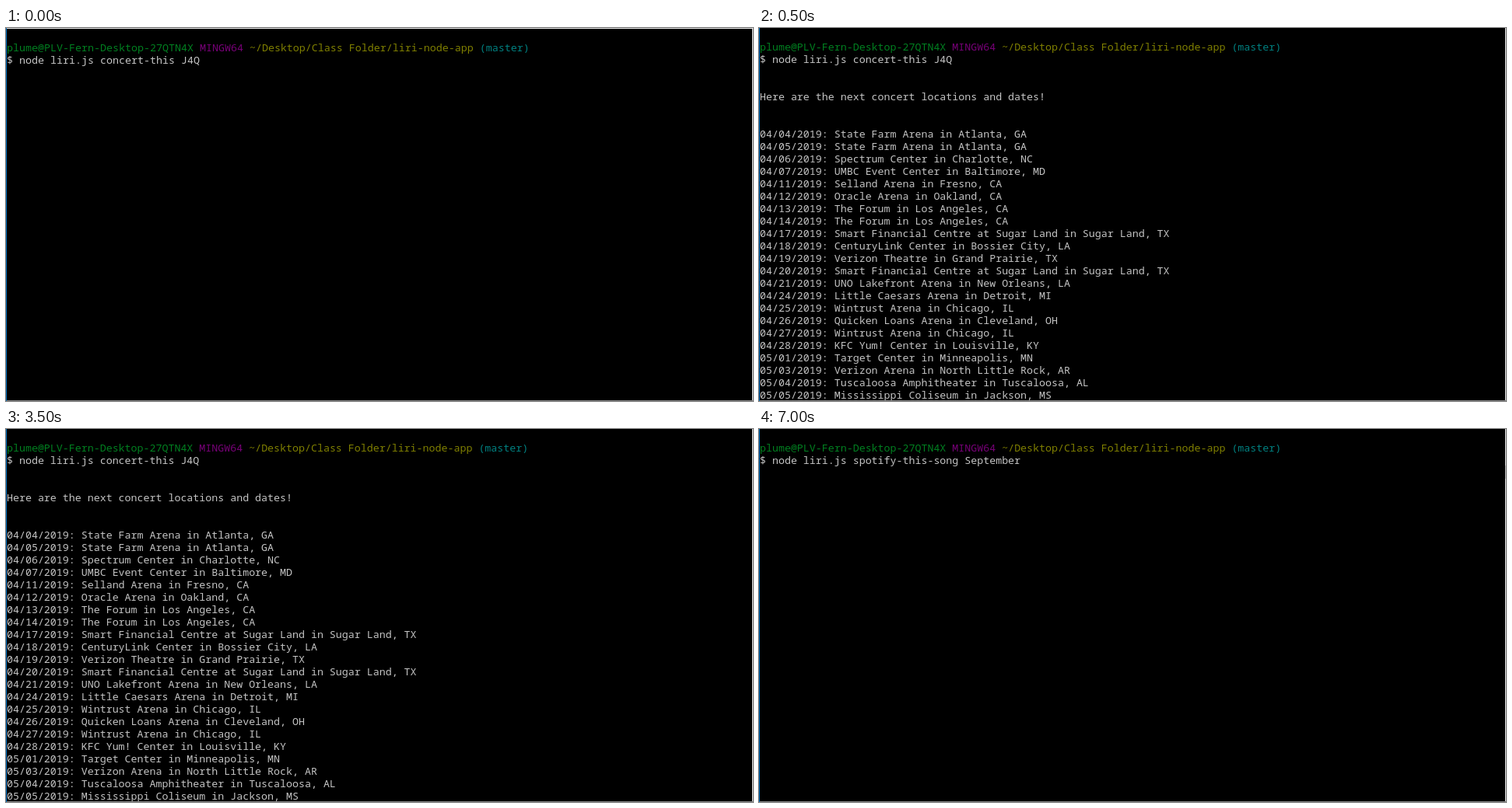
Animation of 960x480 px, one loop 8000 ms. Source, as an HTML page:

```html
<!DOCTYPE html>
<html lang="en">
<head>
<meta charset="utf-8">
<title>Terminal session</title>
<style>
  html, body { margin: 0; width: 100%; height: 100%; overflow: hidden; background: #000; }
  #stage { position: relative; width: 960px; height: 480px; overflow: hidden; background: #000; }
  .screen { position: absolute; inset: 0; opacity: 0; }
  pre {
    position: absolute; left: 1px; top: 16px; margin: 0;
    font: 13.31px/15.98px "Noto Sans Mono", monospace;
    color: #c4c4c4; white-space: pre;
  }
  .user { color: #008020; }
  .system { color: #780078; }
  .path { color: #808000; }
  .branch { color: #008080; }
  .command { border-top: 1px solid #e8e8e8; }
  .command pre { font-size: 13.333px; }
  .edge { position: absolute; left: 0; top: 0; width: 1px; height: 480px; background: #0070c0; }
  .base { position: absolute; left: 1px; top: 479px; width: 959px; height: 1px; background: #808080; }
  .scrollbar { position: absolute; right: 0; top: 0; width: 1px; height: 479px; background: #f0f0f0; }
  .song::after {
    content: ""; position: absolute; right: 0; top: 47px;
    width: 1px; height: 17px; background: #cdcdcd;
  }
</style>
</head>
<body>
<div id="stage"></div>
<script>
const DURATION = 8000;
const stage = document.getElementById("stage");

const prompt = [
  ["user", "plume@PLV-Fern-Desktop-27QTN4X"],
  ["system", "MINGW64"],
  ["path", "~/Desktop/Class Folder/liri-node-app"],
  ["branch", "(master)"]
].map(([name, text]) => `<span class="${name}">${text}</span>`).join(" ");

const concerts = `04/04/2019: State Farm Arena in Atlanta, GA
04/05/2019: State Farm Arena in Atlanta, GA
04/06/2019: Spectrum Center in Charlotte, NC
04/07/2019: UMBC Event Center in Baltimore, MD
04/11/2019: Selland Arena in Fresno, CA
04/12/2019: Oracle Arena in Oakland, CA
04/13/2019: The Forum in Los Angeles, CA
04/14/2019: The Forum in Los Angeles, CA
04/17/2019: Smart Financial Centre at Sugar Land in Sugar Land, TX
04/18/2019: CenturyLink Center in Bossier City, LA
04/19/2019: Verizon Theatre in Grand Prairie, TX
04/20/2019: Smart Financial Centre at Sugar Land in Sugar Land, TX
04/21/2019: UNO Lakefront Arena in New Orleans, LA
04/24/2019: Little Caesars Arena in Detroit, MI
04/25/2019: Wintrust Arena in Chicago, IL
04/26/2019: Quicken Loans Arena in Cleveland, OH
04/27/2019: Wintrust Arena in Chicago, IL
04/28/2019: KFC Yum! Center in Louisville, KY
05/01/2019: Target Center in Minneapolis, MN
05/03/2019: Verizon Arena in North Little Rock, AR
05/04/2019: Tuscaloosa Amphitheater in Tuscaloosa, AL
05/05/2019: Mississippi Coliseum in Jackson, MS`;

const concertCommand = "node liri.js concert-this J4Q";
const screens = [
  { name: "command", start: 0, end: 500, text: concertCommand },
  { name: "results", start: 500, end: 5500,
    text: `${concertCommand}\n\n\nHere are the next concert locations and dates!\n\n\n${concerts}` },
  { name: "song", start: 5500, end: 8000, text: "node liri.js spotify-this-song September" }
];

function addBox(className, html = "") {
  const box = document.createElement("div");
  box.className = className;
  box.innerHTML = html;
  return stage.appendChild(box);
}

addBox("scrollbar");
for (const { name, start, end, text } of screens) {
  const times = [...new Set([0, start, end, DURATION])];
  const steps = times.map(time => ({
    offset: time / DURATION,
    opacity: time >= start && time < end ? 1 : 0,
    easing: "step-end"
  }));
  addBox(`screen ${name}`, `<pre>${prompt}\n$ ${text}</pre>`)
    .animate(steps, { duration: DURATION, iterations: Infinity });
}
addBox("edge");
addBox("base");
</script>
</body>
</html>
```
